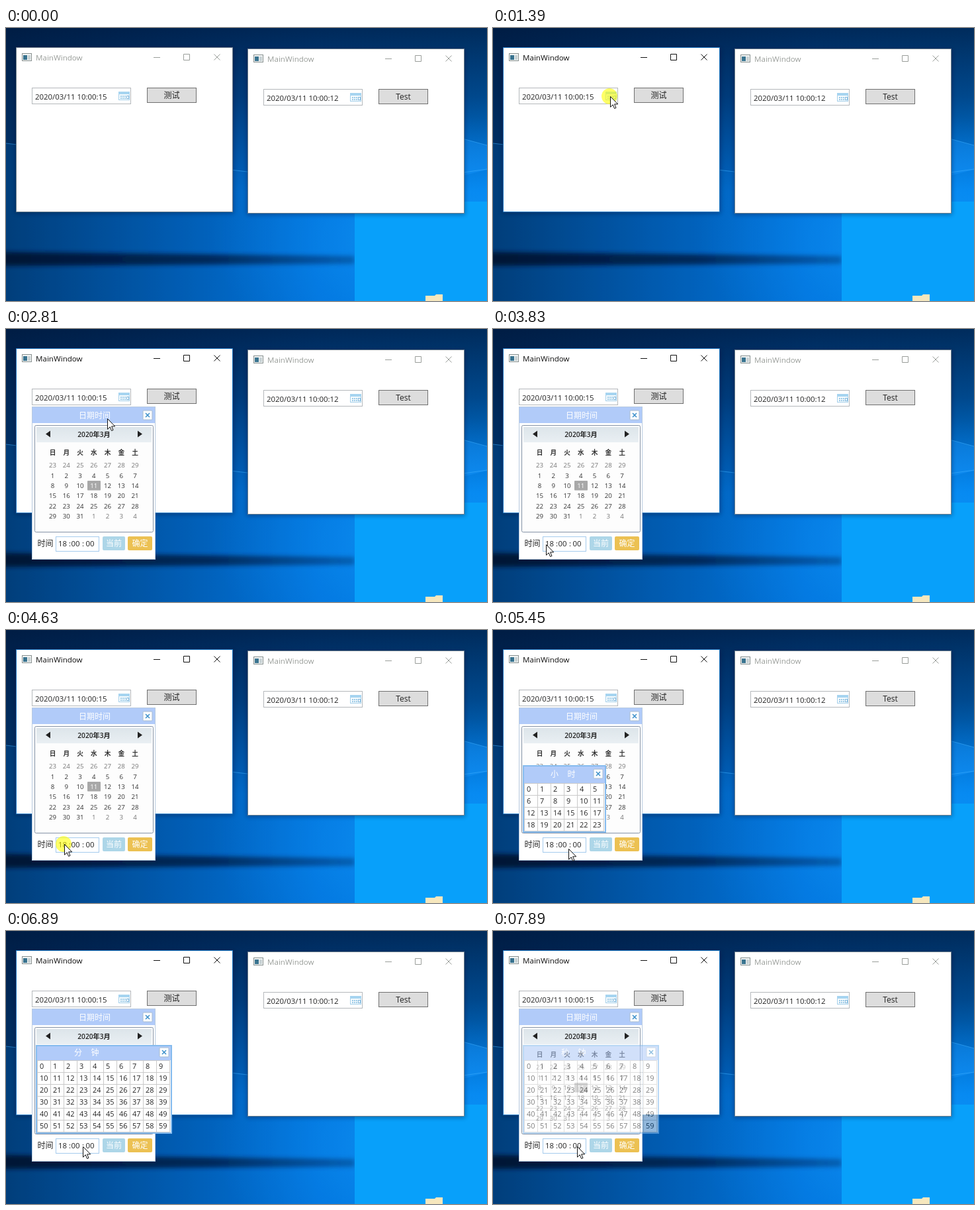
Write an HTML page that moves like this. It is 727 px wide and 412 px high and loops after 8 s.

```html
<!DOCTYPE html>
<html lang="zh-CN">
<head>
<meta charset="utf-8">
<title>Date time picker</title>
<style>
html, body { margin: 0; width: 100%; height: 100%; overflow: hidden; background: #002a5c; }
svg { display: block; width: 727px; height: 412px; }
text { font: 11.4px "Open Sans", "Noto Sans CJK SC", "Noto Sans CJK JP", sans-serif; fill: #222; }
.caption { font-size: 11.6px; fill: currentColor; }
.cjk { font-size: 12px; }
.mid { text-anchor: middle; }
.white { fill: #fff; }
.bold { font-weight: 600; }
.day { font-size: 9.7px; fill: #333; }
.other { fill: #777; }
.today { fill: #fff; }
.cell { font-size: 10.9px; }
.window { color: #9a9e9a; }
.frame { fill: #fff; stroke: #71808e; }
.icons { fill: none; stroke: currentColor; }

/* A small lead keeps each hard change from landing late. */
#first, #first .frame, #calendar, #hours, #minutes, #seconds, #click, #cursor {
  animation: 8s step-end -20ms infinite;
}
#first { animation-name: activate; }
#first .frame { animation-name: border; }
#calendar { animation-name: calendar; }
#hours { animation-name: hours; }
#minutes { animation-name: minutes; }
#seconds { animation-name: seconds; }
#click { animation-name: click; }
#cursor { animation-name: move; }

@keyframes activate { 0% { color: #9a9e9a; } 17.375%, 100% { color: #111; } }
@keyframes border { 0% { stroke: #71808e; } 17.375%, 100% { stroke: #1b78c4; } }
@keyframes calendar { 0% { opacity: 0; } 22.375% { opacity: .47; } 24.875%, 100% { opacity: 1; } }
@keyframes hours {
  0% { opacity: 0; } 60.625% { opacity: .5; } 63.125% { opacity: 1; } 78.375%, 100% { opacity: 0; }
}
@keyframes minutes { 0% { opacity: 0; } 80.875% { opacity: 1; } 96.125%, 100% { opacity: 0; } }
@keyframes seconds { 0% { opacity: 0; } 98.625%, 100% { opacity: .57; } }
@keyframes click {
  0% { opacity: 0; } 17.375% { opacity: 1; } 19.875% { opacity: 0; }
  57.875% { opacity: 1; } 60.625% { opacity: 0; }
  75.875% { opacity: 1; } 78.375% { opacity: 0; }
  93.625% { opacity: 1; } 96.125%, 100% { opacity: 0; }
}
@keyframes move {
  0% { transform: translate(-40px, -40px); }
  2.5% { transform: translate(536px, 356px); }
  5% { transform: translate(468px, 304px); }
  7.5% { transform: translate(384px, 240px); }
  10% { transform: translate(294px, 176px); }
  12.5% { transform: translate(220px, 126px); }
  14.625% { transform: translate(182px, 105px); }
  17.375% { transform: translate(177px, 103px); }
  35.125% { transform: translate(153px, 135px); }
  37.625% { transform: translate(130px, 215px); }
  40.125% { transform: translate(102px, 305px); }
  42.625% { transform: translate(80px, 342px); }
  45.125% { transform: translate(74px, 334px); }
  47.875% { transform: translate(80px, 325px); }
  50.375% { transform: translate(84px, 324px); }
  52.875% { transform: translate(88px, 323px); }
  65.625% { transform: translate(100px, 327px); }
  68.125% { transform: translate(114px, 330px); }
  70.875% { transform: translate(111px, 328px); }
  73.375% { transform: translate(107px, 326px); }
  75.875% { transform: translate(105px, 325px); }
  86.125% { transform: translate(116px, 325px); }
  88.625% { transform: translate(122px, 325px); }
  93.625%, 100% { transform: translate(127px, 325px); }
}
</style>
</head>
<body>
<svg viewBox="0 0 727 412">
  <defs>
    <linearGradient id="sky">
      <stop offset="0" stop-color="#003267"/>
      <stop offset=".35" stop-color="#0055a8"/>
      <stop offset=".65" stop-color="#0074dc"/>
      <stop offset="1" stop-color="#0085ee"/>
    </linearGradient>
    <linearGradient id="dusk" x2="0" y2="1">
      <stop offset="0" stop-color="#00183c" stop-opacity=".82"/>
      <stop offset=".25" stop-color="#00204c" stop-opacity=".6"/>
      <stop offset=".6" stop-color="#00285a" stop-opacity="0"/>
    </linearGradient>
    <linearGradient id="shade">
      <stop offset="0" stop-color="#001433"/>
      <stop offset=".6" stop-color="#00204c" stop-opacity=".85"/>
      <stop offset="1" stop-color="#003c80" stop-opacity=".5"/>
    </linearGradient>
    <radialGradient id="glow">
      <stop offset="0" stop-color="#18a4ff" stop-opacity=".7"/>
      <stop offset="1" stop-color="#0a80f0" stop-opacity="0"/>
    </radialGradient>
    <linearGradient id="bar" x2="0" y2="1">
      <stop offset="0" stop-color="#dde5ea"/>
      <stop offset="1" stop-color="#e9eff3"/>
    </linearGradient>
    <filter id="blur" x="-10%" y="-60%" width="120%" height="220%"><feGaussianBlur stdDeviation="3"/></filter>
  </defs>

  <rect width="727" height="412" fill="url(#sky)"/>
  <rect width="727" height="412" fill="url(#dusk)"/>
  <ellipse cx="640" cy="320" rx="330" ry="190" fill="url(#glow)"/>
  <path d="M0 174L365 216L727 300V412H0Z" fill="#0a7ae0" opacity=".16"/>
  <path d="M727 177L620 148V240L727 214Z" fill="#1c98ff" opacity=".35"/>
  <path d="M0 174L365 217M620 148L727 177M620 228L727 213" fill="none" stroke="#45b4ff" opacity=".5"/>
  <path d="M-10 338L527 344V356L-10 359Z" fill="url(#shade)" filter="url(#blur)"/>
  <rect x="527" y="262" width="210" height="210" fill="#08a0fa"/>
  <path d="M634 404h14l2-2h10v10h-26z" fill="#f6e7bd"/>

  <g id="first" class="window"></g>
  <g id="second" class="window" transform="translate(350 2)"></g>
  <g id="calendar"></g>
  <g id="hours"></g>
  <g id="minutes"></g>
  <g id="seconds"></g>
  <g id="cursor">
    <circle id="click" cx="-1" r="12" fill="#ff0" fill-opacity=".6"/>
    <path d="M.5 .5V16.3L4.2 12.8L6.6 18.5L9 17.5L6.6 11.9H11.7Z" fill="#fff" stroke="#111"/>
  </g>
</svg>
<script>
const box = (x, y, w, h, attrs) => `<rect x="${x}" y="${y}" width="${w}" height="${h}" ${attrs}/>`;
const text = (x, y, value, cls = "") => `<text x="${x}" y="${y}" class="${cls}">${value}</text>`;
const range = n => [...Array(n).keys()];
const fill = (id, markup) => { document.getElementById(id).innerHTML = markup; };

const closeButton = (cx, cy) =>
  box(cx - 7, cy - 7, 14, 14, 'rx="1.5" fill="#fafcff" stroke="#a9bccf"') +
  `<path d="M${cx - 3} ${cy - 3}l6 6m0-6l-6 6" stroke="#3b8fc9" stroke-width="1.5"/>`;

function windowMarkup(time, label) {
  const dots = range(8).map(i => box(173 + i % 4 * 3, 102 + (i >> 2) * 3, 2, 2, 'fill="#9ccbe8"')).join("");
  return box(14, 31, 330, 249, 'fill="#001028" opacity=".35" filter="url(#blur)"') +
    box(15.5, 29.5, 327, 248, 'class="frame"') +
    box(24.5, 38.5, 14, 11, 'fill="#f4f6f6" stroke="#87908f"') +
    box(26, 41, 6, 7, 'fill="#39738f"') + box(33, 41, 4, 7, 'fill="#c8d2d4"') +
    text(45, 49, "MainWindow", "caption") +
    '<path class="icons" d="M223 44.5h10M268.5 39.5h9v9h-9zM314.5 39.5l9 9m0-9l-9 9"/>' +
    box(39.5, 90.5, 149, 24, 'fill="#fff" stroke="#b4b8bb"') +
    text(44, 108, time) +
    box(170.5, 96.5, 16, 12, 'fill="#f4fafd" stroke="#a6d0ea"') +
    box(170, 96, 17, 4, 'fill="#a6d4f0"') + dots +
    box(182.5, 102.5, 3, 4, 'fill="#fff" stroke="#7eb6dc"') +
    box(213.5, 90.5, 74, 22, 'fill="#ddd" stroke="#707070"') +
    text(250.5, 106, label, "cjk mid");
}

function calendarMarkup() {
  const colX = i => 70.5 + i * 20.75;
  const days = range(42).map(i => {
    const day = i < 7 ? 23 + i : (i - 7) % 31 + 1;
    const kind = i < 7 || i > 37 ? "other" : day === 11 ? "today" : "";
    return text(colX(i % 7), 209.2 + (i / 7 | 0) * 15.4, day, "day mid " + kind);
  }).join("");
  const weekdays = [..."日月火水木金土"].map((d, i) => text(colX(i), 190, d, "day mid bold")).join("");
  return box(39.5, 117.5, 186, 230, 'fill="#fff" stroke="#b9cbe0"') +
    box(40, 118, 185, 24, 'fill="#b1cbf9"') +
    text(134, 135, "日期时间", "cjk mid white") + closeButton(214, 130) +
    box(43.5, 145.5, 179, 161, 'rx="2" fill="#fdfdfd" stroke="#8492a5"') +
    box(46, 148, 174, 23, 'fill="url(#bar)"') +
    '<path d="M67 153.5v10l-7-5zM199 153.5v10l7-5z" fill="#222"/>' +
    '<text x="133" y="162.5" class="mid bold" style="font-size:10.2px">2020年3月</text>' +
    weekdays + box(123, 229, 20, 14.5, 'rx="1" fill="#a8a8a8"') + days +
    text(47.5, 328, "时间", "cjk") +
    box(75.5, 313.5, 65, 22, 'fill="#fff" stroke="#a5cbed"') +
    text(79, 328, "18") + text(95, 328, ":") + text(98.5, 328, "00") +
    text(115, 328, ":") + text(120.5, 328, "00") +
    box(146, 313, 34, 21, 'rx="2" fill="#add6e8"') + text(163, 328, "当前", "cjk mid white") +
    box(184, 313, 37, 21, 'rx="2" fill="#ecc153"') + text(202.5, 328, "确定", "cjk mid white");
}

function gridMarkup(top, cols, rows, titleX, title) {
  const width = cols * 20 + 6, gridTop = 303 - rows * 18, barMid = (top + gridTop) / 2 - .5;
  const cells = range(cols * rows).map(n => {
    const x = 47 + n % cols * 20, y = gridTop + (n / cols | 0) * 18;
    return box(x + .5, y + .5, 20, 18, 'fill="none" stroke="#cacaca"') + text(x + 4, y + 13, n, "cell");
  }).join("");
  return box(46, top + 1, width - 2, 305 - top - 1, 'fill="#fff" stroke="#85bbee" stroke-width="2"') +
    box(47, top + 2, width - 4, gridTop - top - 2, 'fill="#b1cbf9"') +
    [...title].map((c, i) => text(titleX + i * 25.5, barMid + 4.5, c, "cjk white")).join("") +
    closeButton(45 + width - 12, Math.round(barMid)) + cells;
}

fill("first", windowMarkup("2020/03/11 10:00:15", "测试"));
fill("second", windowMarkup("2020/03/11 10:00:12", "Test"));
fill("calendar", calendarMarkup());
fill("hours", gridMarkup(204, 6, 4, 87, "小时"));
fill("minutes", gridMarkup(172, 10, 6, 103, "分钟"));
fill("seconds", gridMarkup(172, 10, 6, 103, "秒钟"));
</script>
</body>
</html>
```
